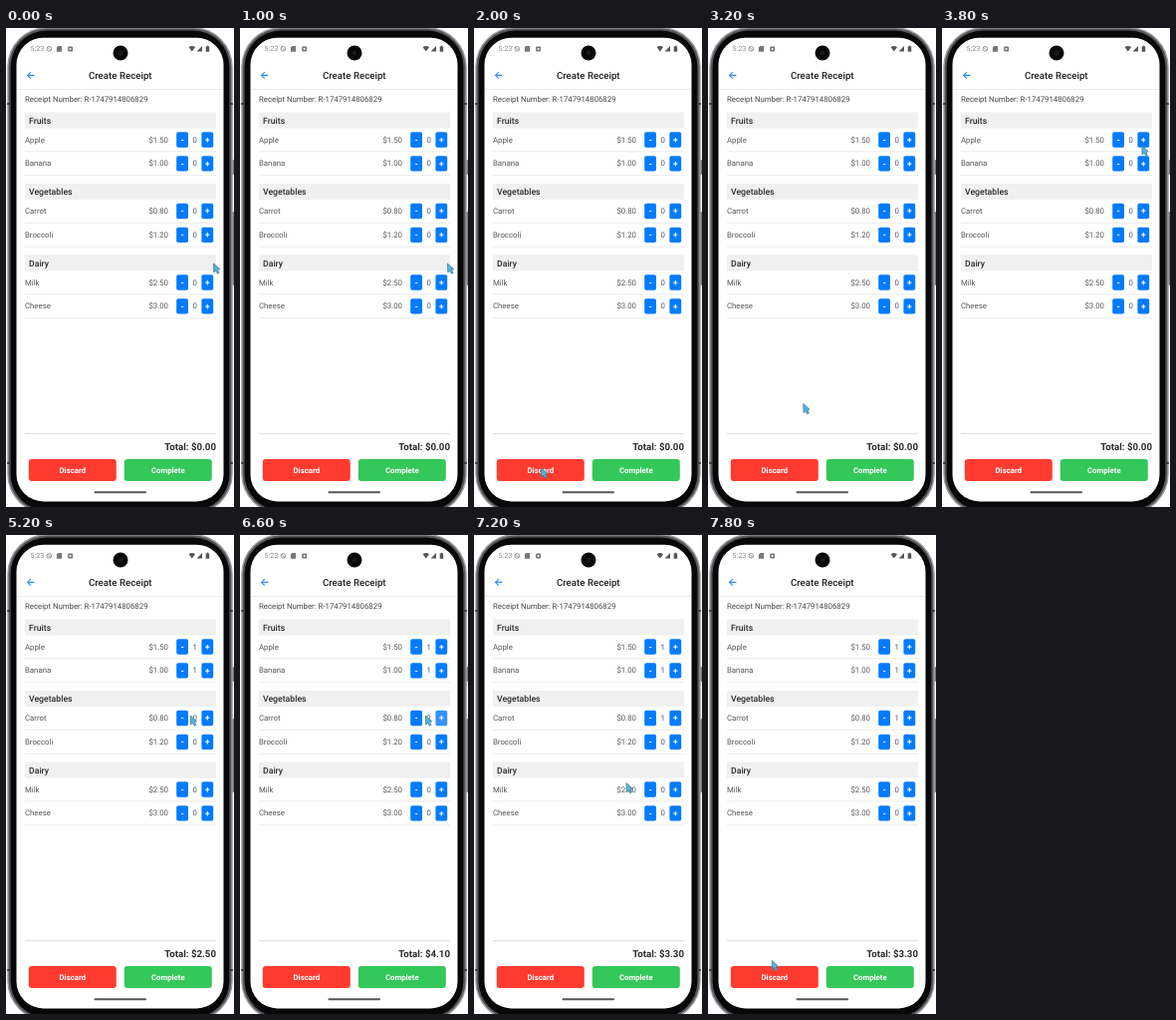
An HTML page that plays this animation: 229x480 px, repeating every 8 s.

```html
<!DOCTYPE html>
<html lang="en">
<head>
<meta charset="utf-8">
<title>Create Receipt</title>
<style>
html, body { margin: 0; width: 100%; height: 100%; overflow: hidden; background: #fff; }
svg { display: block; width: 100%; height: 100%; }
text { font-family: Roboto, "Open Sans", sans-serif; font-size: 7.8px; fill: #555; text-rendering: geometricPrecision; }
.title { font-size: 9.7px; font-weight: 500; fill: #222; text-anchor: middle; }
.number { fill: #444; }
.head { font-size: 8.7px; font-weight: 500; fill: #2b2b2b; }
.end { text-anchor: end; }
.mid { text-anchor: middle; }
.sign { font-size: 8.5px; font-weight: 700; fill: #fff; text-anchor: middle; }
.total { font-size: 9.7px; font-weight: 700; fill: #2b2b2b; text-anchor: end; }
.action { font-weight: 700; fill: #fff; text-anchor: middle; }
.clock { font-size: 7.2px; fill: #888; }
.key { fill: #007bff; }
.key.lit { fill: #3593ff; }
</style>
</head>
<body>
<svg viewBox="0 0 229 480" preserveAspectRatio="none">
  <!-- phone body: side keys, metal rim, glass, screen -->
  <rect x="226.5" y="132" width="2.5" height="15" rx="1" fill="#777"/>
  <rect x="226.5" y="184" width="2.5" height="74" rx="1" fill="#777"/>
  <rect x="1.2" y="-1" width="226.6" height="488" rx="40" fill="#a2a2a5"/>
  <rect x="2.6" y=".4" width="223.8" height="485.2" rx="38.6" fill="#55555a"/>
  <rect x="4.6" y="2.4" width="219.8" height="481.2" rx="36.6" fill="#080808"/>
  <path d="M1.2 76h3.4M1.2 436h3.4M224.4 76h3.4M224.4 436h3.4" stroke="#3a3a3d" stroke-width="2"/>
  <rect x="10.5" y="9.8" width="208" height="464.6" rx="27" fill="#fff"/>
  <circle cx="115" cy="25" r="7.5" fill="#080808"/>
  <circle cx="115" cy="25" r="2.4" fill="#17191f"/>

  <!-- status bar -->
  <text class="clock" x="24.5" y="23.4">5:23</text>
  <g fill="none" stroke="#888" stroke-width=".9">
    <circle cx="43.3" cy="20.8" r="2.3"/>
    <path d="M41.7 19.2l3.2 3.2"/>
  </g>
  <path d="M52.3 18h3.8v5.8h-5.2v-4.4z" fill="#777"/>
  <rect x="62.2" y="18.4" width="4.8" height="5" rx=".6" fill="#777"/>
  <circle cx="64.6" cy="20.9" r="1" fill="#fff"/>
  <path d="M183.6 19.2q3.2-2.4 6.4 0l-3.2 4.4z" fill="#555"/>
  <path d="M197 18v5.6h-5.4z" fill="#555"/>
  <path d="M200.7 18.4h1v-.7h1.5v.7h1v5.3h-3.5z" fill="#555"/>

  <!-- header -->
  <path d="M28.4 47.4h-6.6M24.8 44.2l-3.2 3.2 3.2 3.2" fill="none" stroke="#2f8cff" stroke-width="1.2"/>
  <text class="title" x="114.8" y="51">Create Receipt</text>
  <path d="M11 61.5h207" stroke="#e8e8e8" stroke-width=".8"/>
  <text class="number" x="19" y="74.3">Receipt Number: R-1747914806829</text>

  <g id="list"></g>

  <!-- footer -->
  <path d="M19 406.7h192" stroke="#dadada" stroke-width=".9"/>
  <text class="total" id="total" x="211" y="423.2"></text>
  <rect x="22.8" y="432" width="88" height="22" rx="3" fill="#ff3b30"/>
  <text class="action" x="66.8" y="446">Discard</text>
  <rect x="118.8" y="432" width="88" height="22" rx="3" fill="#34c759"/>
  <text class="action" x="162.8" y="446">Complete</text>
  <rect x="88.5" y="464.2" width="52.5" height="2" rx="1" fill="#555"/>

  <path id="cursor" d="M0 0l.3 9 2-1.8 1.7 3 1.6-.9-1.6-2.8 2.3-.7z" fill="#58b4dc" stroke="#3b7d9c" stroke-width=".8" stroke-linejoin="round"/>
</svg>
<script>
const LOOP = 8000, STEP = 200;
const groups = [
  ['Fruits', 84.5, [['Apple', 1.5], ['Banana', 1]]],
  ['Vegetables', 156, [['Carrot', 0.8], ['Broccoli', 1.2]]],
  ['Dairy', 227.5, [['Milk', 2.5], ['Cheese', 3]]]
];

// time, x, y of the pointer tip
const path = [
  [0, 208.5, 236], [1000, 208.5, 236], [1400, 170, 318], [1800, 76, 436],
  [2000, 67.5, 441], [3000, 67.5, 441], [3400, 124, 312], [3800, 200.8, 118],
  [4200, 200.8, 118], [4600, 201, 138], [4800, 201, 138], [5200, 185.2, 181],
  [5600, 201, 183], [6400, 201, 183], [6600, 186.4, 181], [6800, 178, 183],
  [7000, 178, 183], [7400, 128, 314], [7800, 64.2, 426.5]
];

// press start, count change, release, item, change
const presses = [
  [4000, 4200, 4400, 'Apple', 1],
  [4600, 4800, 5000, 'Banana', 1],
  [5600, 5800, 6000, 'Carrot', 1],
  [6200, 6400, 6800, 'Carrot', 1],
  [6800, 7000, 7200, 'Carrot', -1]
];

const list = document.getElementById('list');
const total = document.getElementById('total');
const cursor = document.getElementById('cursor');
const items = {};

function add(tag, attrs, text) {
  const el = document.createElementNS('http://www.w3.org/2000/svg', tag);
  for (const k in attrs) el.setAttribute(k, attrs[k]);
  if (text) el.textContent = text;
  list.appendChild(el);
  return el;
}

function addKey(x, y, sign) {
  const key = add('rect', { class: 'key', x, y: y - 7.6, width: 11.8, height: 15.4, rx: 1.8 });
  add('text', { class: 'sign', x: x + 5.9, y: y + 2.9 }, sign);
  return key;
}

function addItem(name, price, y) {
  add('text', { x: 19, y: y + 2.6 }, name);
  add('text', { class: 'end', x: 163, y: y + 2.6 }, '$' + price.toFixed(2));
  const minus = addKey(171.2, y, '-');
  const count = add('text', { class: 'mid', x: 189.6, y: y + 2.6 }, '0');
  const plus = addKey(196.4, y, '+');
  add('path', { d: `M19 ${y + 11.9}h192`, stroke: '#e6e6e6', 'stroke-width': 0.8 });
  items[name] = { price, minus, plus, count };
}

for (const [title, top, rows] of groups) {
  add('rect', { x: 19, y: top, width: 192, height: 16, fill: '#f0f0f0' });
  add('text', { class: 'head', x: 23, y: top + 11.1 }, title);
  rows.forEach(([name, price], i) => addItem(name, price, top + 27.4 + i * 23.9));
}

function pointAt(t) {
  const i = path.findIndex(p => p[0] > t);
  if (i < 0) return path[path.length - 1].slice(1);
  const [t0, x0, y0] = path[i - 1], [t1, x1, y1] = path[i];
  const k = (t - t0) / (t1 - t0);
  return [x0 + (x1 - x0) * k, y0 + (y1 - y0) * k];
}

function draw(t) {
  const [x, y] = pointAt(t);
  cursor.setAttribute('transform', `translate(${x} ${y})`);
  let sum = 0;
  for (const name in items) {
    const item = items[name];
    const own = presses.filter(p => p[3] === name);
    const n = own.reduce((a, p) => a + (t >= p[1] ? p[4] : 0), 0);
    const held = own.find(p => t >= p[0] && t < p[2]);
    item.count.textContent = n;
    item.plus.classList.toggle('lit', !!held && held[4] > 0);
    item.minus.classList.toggle('lit', !!held && held[4] < 0);
    sum += n * item.price;
  }
  total.textContent = 'Total: $' + sum.toFixed(2);
}

const start = performance.now();
function tick(now) {
  const t = Math.max(0, now - start) % LOOP;
  draw(Math.floor(t / STEP) * STEP);
  requestAnimationFrame(tick);
}
draw(0);
requestAnimationFrame(tick);
</script>
</body>
</html>
```
